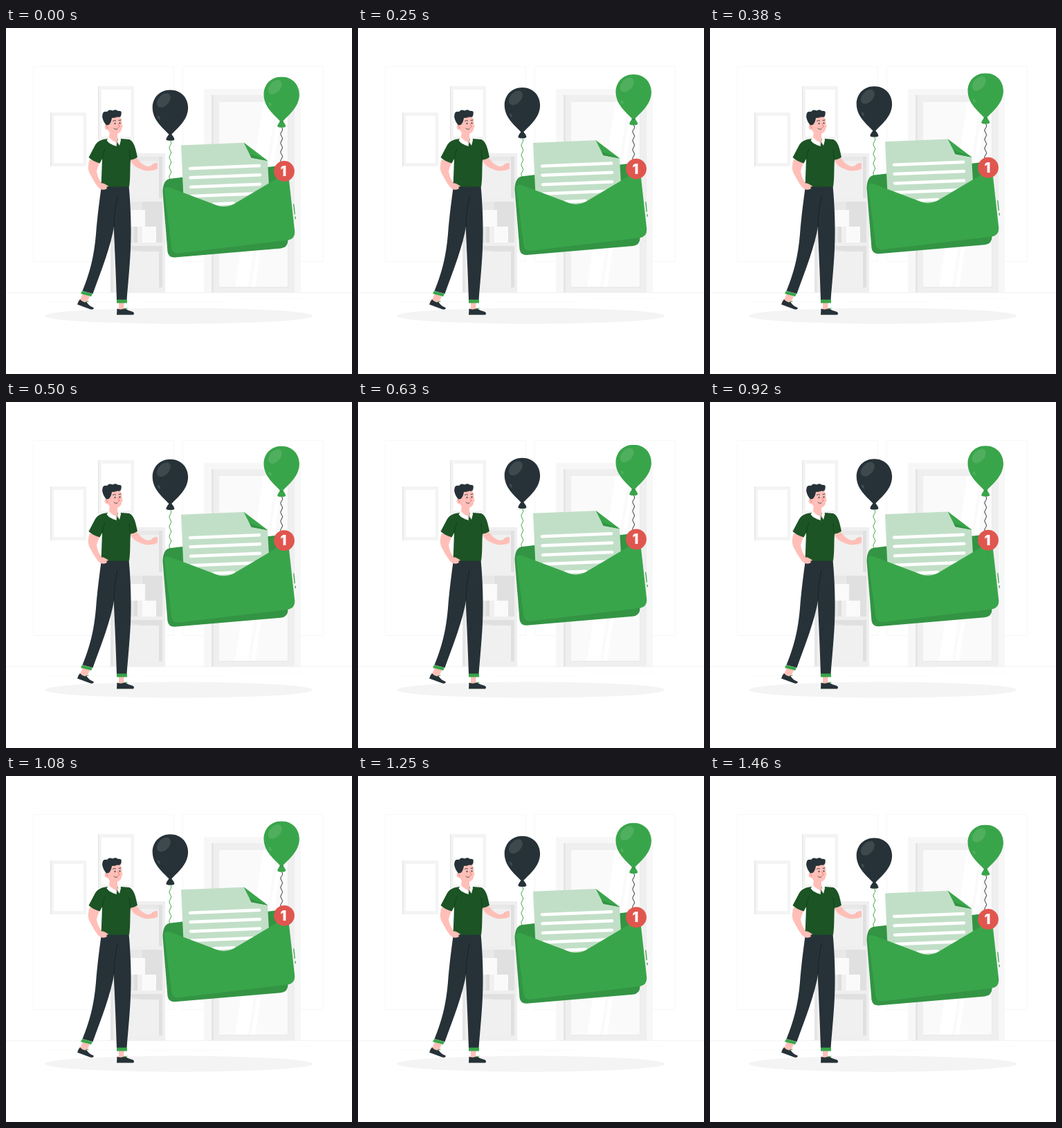
These frames come from a looping animation (500 by 500 pixels, 1.5 s). An HTML page:

```html
<!DOCTYPE html>
<html lang="en">
<head>
<meta charset="utf-8">
<title>New message</title>
<style>
html, body { margin: 0; width: 100%; height: 100%; overflow: hidden; background: #fff; }
svg { display: block; width: 100vw; height: 100vh; }
.green { fill: #39a54a; }
.deep { fill: #339444; }
.dark { fill: #263238; }
.skin { fill: #ffbfb8; }
.shirt { fill: #1c5425; }
.line { fill: none; stroke-linecap: round; stroke-linejoin: round; }
</style>
</head>
<body>
<svg viewBox="0 0 500 500">
  <defs>
    <path id="bulb" d="M0 0C15 0 25.7 11 25.7 25.500C25.700 43 11 55 1.500 64.500H-1.500C-11 55 -25.700 43 -25.700 25.500C-25.700 11 -15 0 0 0Z"/>
    <path id="knot" d="M-1.500 63.500H1.500C4 67 6 69 6 72Q3 74 0 73Q-3 74 -6 72C-6 69 -4 67 -1.500 63.500Z"/>
    <g id="shine" fill="#fff" opacity=".11">
      <ellipse cx="-9.500" cy="15" rx="7.800" ry="12" transform="rotate(42 -9.500 15)"/>
      <ellipse cx="-16.500" cy="40" rx="1.600" ry="3" transform="rotate(-28 -16.500 40)"/>
    </g>
  </defs>

  <!-- room -->
  <g fill="none" stroke="#f7f7f7">
    <path d="M39.500 55.500H242.500V337.500H39.500ZM255.500 55.500H458.500V337.500H255.500Z"/>
    <path d="M0 382.500H500" stroke="#f2f2f2"/>
    <path d="M57 395.500H187M194 395.500H320M330 390.500H440" stroke="#fbfbfb"/>
  </g>
  <g id="frames"></g>

  <path fill="#f7f7f7" d="M286 88H426V382H286Z"/>
  <path fill="#efefef" d="M297 97H417V382H297Z"/>
  <path fill="#e5e5e5" d="M297 97H300V382H297Z"/>
  <path fill="#fafafa" d="M308 106H407V374H308Z"/>
  <path fill="#fff" d="M372 106H391L350 374H331ZM395 106H401L360 374H354Z"/>
  <path fill="none" stroke="#e9e9e9" d="M308 106H407.500V374.500H308"/>

  <path fill="#efefef" d="M151 181H230V382H151Z"/>
  <path fill="#e6e6e6" d="M151 181H155V382H151Z"/>
  <path fill="#e8e8e8" d="M155 186H226V246H155ZM155 251H226V310H155ZM155 315H226V375H155Z"/>
  <path fill="#f0f0f0" d="M155 192H221V246H155ZM155 323H221V375H155Z"/>
  <path fill="#e0e0e0" d="M197 251H226V310H197ZM221 186H226V246H221ZM221 315H226V375H221ZM155 315H226V323H197Z"/>
  <path fill="#fafafa" d="M176 263H201V287H176ZM197 287H217V310H197Z"/>
  <path fill="#f0f0f0" d="M190 287H197V310H190Z"/>
  <path fill="#dedede" d="M185 287H190V310H185Z"/>

  <ellipse cx="249.500" cy="416" rx="193.500" ry="11.500" fill="#f4f4f4"/>

  <!-- man -->
  <g>
    <path class="skin" d="M111 384L121 388L116 398L107 393ZM163 396H170.500L170 408H163Z"/>
    <path class="dark" d="M107 392Q104 395 103 399.500L122 406.500Q127.500 407.500 126.500 404Q119 401 116.500 396Q111 397 107 392Z"/>
    <path class="dark" d="M160.500 405.500L160 414.500H184Q186.500 412 183 410Q176 408.500 171.500 405Q166 408 160.500 405.500Z"/>
    <path class="line" stroke="#39a54a" d="M115 396L119 395M170 406L175 405"/>

    <path class="dark" d="M138 228H172L156.500 284C152 315 137 352 125.500 384L110.500 380C121 354 127 332 130 298C132 272 135 250 138 228Z"/>
    <path class="dark" d="M150 228H177.500C180 255 181.500 290 180 320C178.500 350 176 372 174.500 393.500H160C159 360 157 315 155.500 284Z"/>
    <path class="line" stroke="#151d21" stroke-width=".8" d="M161 243C158 258 156 270 156 286"/>
    <path class="green" d="M110 380L125 384L123 388L108 384ZM160 392.500H175V397.500H160Z"/>

    <path class="skin" d="M121 190C118 198 118 206 122 212C126 220 131 229 137 233L140 225C135 221 132 214 131 207C132 202 134 198 136 193Z"/>
    <path class="skin" d="M179 188C181 197 187 201 195 204C200 206.500 205 207 209 206Q214 206 219 203.500L219 196Q217 193 214 197L207 200C200 200 193 194 188 186Z"/>

    <path class="shirt" d="M147 160C138 161 133 163 129 169L119.500 187Q126 193 135.500 195.500L139 189L137.500 229.500H178C180 217 179 203 180 190.500Q186 190 190 186.500C188 178 186 164 178 161L166 160Z"/>
    <path class="line" stroke="#123d19" stroke-width=".8" d="M139 189Q140 182 143 175M180 190Q178 183 178 176"/>
    <path class="skin" d="M134 225Q139 223.500 143 225.500L148 228.500Q147 230 145 229.500L146 232Q142 235 137 233L132 229Z"/>

    <path class="skin" d="M150 146H161V162L160 169Q154 166 149 160Z"/>
    <path fill="#fff" d="M149 158L145.500 162Q148 167 155 169L159 165Q153 163 149 158ZM161 165L162 157Q166 158 166 162L164 170Z"/>
    <path fill="#fff" d="M152 163L159 166L160 171L154 169Z"/>

    <path class="skin" d="M146 131C149 126 162 125 166 130Q168 135 167.500 139Q169.500 142 167.500 144C167 150 163 153 158 153C152 152.500 148 150 147 147Z"/>
    <ellipse class="skin" cx="146" cy="143" rx="3.400" ry="4"/>
    <path class="dark" d="M145 140.500C141 136 138 129 139.500 125Q140 120 146 121Q149 117 154 119.500Q159 117 162 120Q168 119 166.500 125Q166 130 161 128.500Q157 130 153 130Q152 137 148.500 140Z"/>
    <g class="dark">
      <ellipse cx="157.500" cy="138" rx=".8" ry="1.300"/>
      <ellipse cx="164.500" cy="137.500" rx=".8" ry="1.300"/>
    </g>
    <path class="line" stroke="#263238" stroke-width=".9" d="M154.500 134.500Q156.500 132.500 158.500 134M163 133.500L166 133"/>
    <path class="line" stroke="#e5776f" stroke-width=".8" d="M162 138L164 143L161.500 143.500M145 142Q147 142 147 145"/>
    <path class="line" stroke="#263238" stroke-width=".8" d="M156 145Q158 147.500 161 146"/>
    <path class="line" stroke="#ee958c" stroke-width=".7" d="M211 198L215 196"/>
  </g>

  <!-- floating mail -->
  <g id="mail">
    <path id="stringA" class="line" stroke="#39a54a"/>
    <path id="stringB" class="line" stroke="#263238"/>
    <g transform="translate(237.400 89)">
      <use href="#knot" class="dark"/><use href="#bulb" class="dark"/><use href="#shine"/>
    </g>
    <g transform="translate(398.200 70)">
      <use href="#knot" class="green"/><use href="#bulb" class="green"/>
      <path class="deep" d="M-3 64H3L2 66H-2Z"/><use href="#shine"/>
    </g>
    <path class="line" stroke="#39a54a" stroke-width="1.300" d="M415.800 254.500L417.200 268M418 272.500L418.300 275"/>

    <path class="deep" d="M226.500 236Q227 219.500 236 217.500L395 198.500Q405 197 407.500 208V306Q407.500 317 397 318L244 331Q235 331.500 233.500 323Z"/>
    <path fill="#c1dfc7" d="M253 169L343.500 165.300L378 191.500L381 245L310 262L256.500 245Z"/>
    <path class="green" d="M343.500 165L378.500 191.500L354.500 187Z"/>
    <path class="deep" d="M354.500 187L378.500 191.500L352 181.500Z"/>
    <g id="rows" class="line" stroke="#fff" stroke-width="4.500"></g>
    <path class="green" d="M228.500 232Q231 228 238 230.500L300 254Q316 261.500 330 253.500L404 209.500Q408 209.500 408.500 215L417.300 294Q417.500 304 408 306L249 325Q240.500 325.500 239.300 317Z"/>
    <circle cx="402" cy="206.500" r="14.900" fill="#e0564f"/>
    <text x="401" y="213.500" fill="#fff" text-anchor="middle" font-family="Inter, sans-serif" font-size="19.500" font-weight="900">1</text>
  </g>
</svg>
<script>
const $ = id => document.getElementById(id);
const LOOP = 1500, LOW = .5, HIGH = -9.5;

const frame = (x, y) => `<path fill="#f4f4f4" d="M${x} ${y}h52v78h-52z"/>
  <path fill="#e6e6e6" d="M${x} ${y}h1.500v78h-1.500z"/>
  <path fill="#fff" d="M${x + 5} ${y + 5}h42.500v68h-42.500z"/>`;
$("frames").innerHTML = frame(64, 122) + frame(133, 84);

// Alternating curves make a curled string.
const curl = (x, y, n, step) => {
  let d = `M${x} ${y}`;
  for (let i = 0; i < n; i++) d += `q${i % 2 ? -3 : 3} ${step / 2} 0 ${step}`;
  return d;
};
$("stringA").setAttribute("d", curl(237.300, 162, 8, 7));
$("stringB").setAttribute("d", curl(398.200, 143, 8, 6.500));

const rows = [[266, 202.500, 366, 198.500], [266.500, 215.700, 367, 211.700], [267, 229.200, 367, 225.200],
  [268, 242.500, 368, 238.500], [300, 254, 329, 252.800]];
$("rows").innerHTML = rows.map(([a, b, c, d]) => `<path d="M${a} ${b}L${c} ${d}"/>`).join("");

// Rise and fall take 35 of 36 ticks; the last tick rests.
const at = (y, tick) => ({ transform: `translate(0px, ${y}px)`, offset: tick / 36 });
$("mail").animate(
  [at(LOW, 0), at(HIGH, 17.5), at(LOW, 35), at(LOW, 36)],
  { duration: LOOP, iterations: Infinity, easing: "linear" }
);
</script>
</body>
</html>
```
